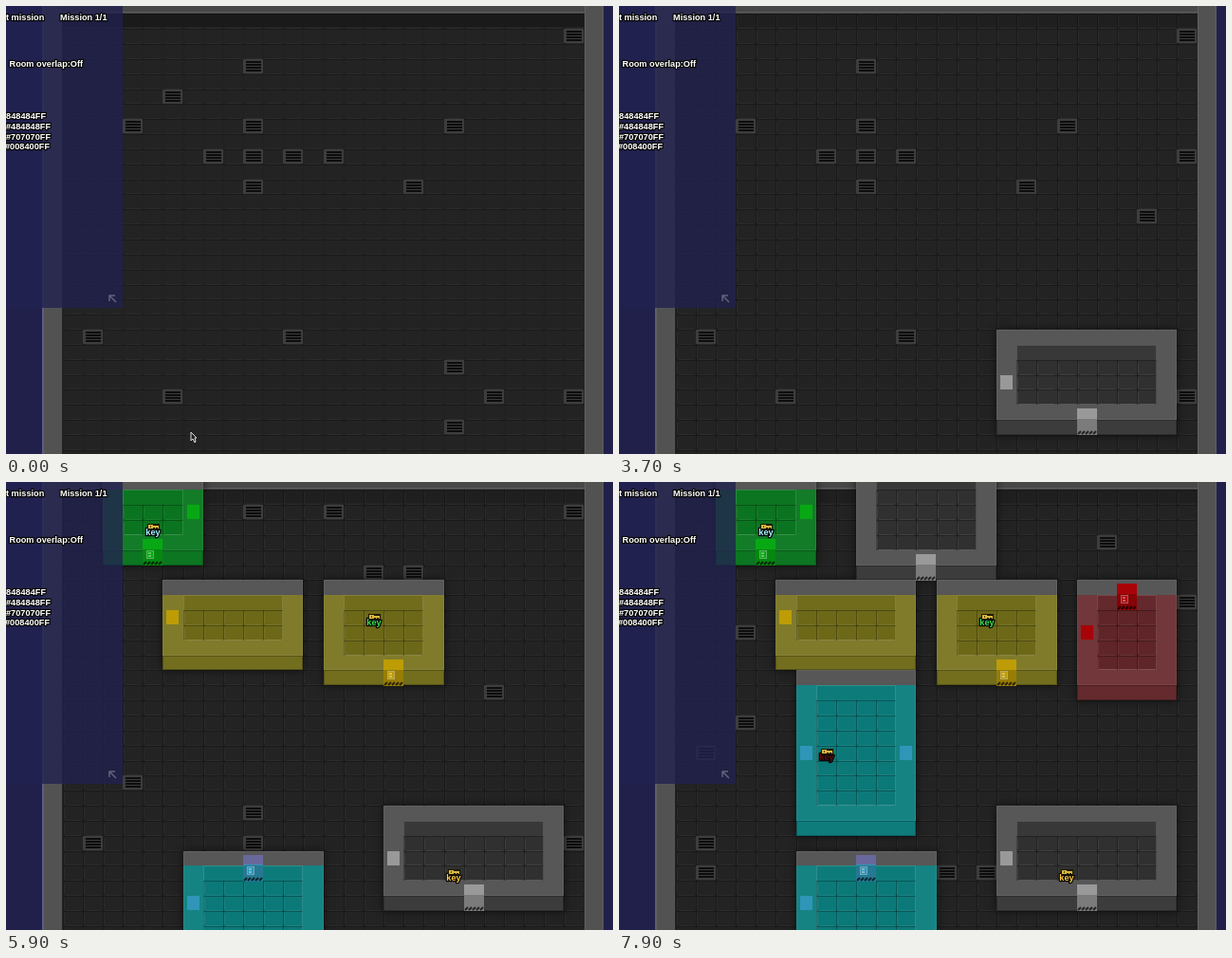
An HTML page with a canvas for the animation above (8 s loop, 640 px wide and 472 px high).

```html
<!DOCTYPE html>
<html>
<head>
<meta charset="utf-8">
<style>
html, body { margin: 0; width: 640px; height: 472px; overflow: hidden; background: #20204a; }
canvas { display: block; }
</style>
</head>
<body>
<canvas id="stage" width="640" height="472"></canvas>
<script>
const ctx = document.getElementById('stage').getContext('2d');
const LOOP = 8000;
const X = c => Math.round(38.5 + 21.15 * c);
const Y = r => Math.round(8.4 + 15.84 * r);

function rect(color, x, y, w, h) {
  ctx.fillStyle = color;
  ctx.fillRect(x, y, w, h);
}
// Rectangle in tile units, from corner (c0, r0) to (c1, r1).
function tiles(color, c0, r0, c1, r1) {
  rect(color, X(c0), Y(r0), X(c1) - X(c0), Y(r1) - Y(r0));
}
function frame(color, c0, r0, c1, r1) {
  ctx.strokeStyle = color;
  ctx.lineWidth = 1;
  ctx.strokeRect(X(c0) + .5, Y(r0) + .5, X(c1) - X(c0) - 1, Y(r1) - Y(r0) - 1);
}

// Vent layouts: [column, row] pairs on every second tile.
const shared = [[12,0],[4,1],[1,3],[4,3],[9,3],[3,4],[4,4],[5,4],[4,5],[8,5],
  [0,10],[5,10],[9,11],[2,12],[10,12],[12,12],[9,13]];
const layouts = [
  { at: 0, vents: [...shared, [2,2], [6,4]] },
  { at: 3300, vents: [...shared, [12,4], [11,6]] },
  { at: 3900, vents: [[5,0],[10,0],[11,1],[6,2],[10,3],[7,7],[0,8],[1,11],[2,13]] },
  { at: 5000, vents: [[4,0],[6,0],[12,0],[7,2],[8,2],[10,6],[1,9],[4,10],[4,11],[0,11],[12,11]] },
  { at: 6500, vents: [[12,0],[11,1],[7,2],[8,2],[9,6],[10,6],[0,11],[12,11]] },
  { at: 7400, vents: [[10,1],[12,3],[1,4],[1,7],[0,8],[0,11],[0,12],[6,12],[7,12]] }
];

const grey = { door: '#999999' };
const yellow = { tint: 'rgba(168,160,0,.5)', door: '#bd9c06' };
const green = { tint: 'rgba(0,135,28,.78)', door: '#08a814' };
const cyan = { tint: 'rgba(0,148,148,.74)', door: '#2f96b8' };
const red = { tint: 'rgba(135,28,34,.54)', door: '#a80408' };

// box: tile corners; gate: door in a horizontal wall; sides: doors in vertical walls.
const rooms = [
  { at: 3300, look: grey, box: [17,21,26,28], gate: [21,26], sides: [[17,24]] },
  { at: 3900, look: yellow, box: [6,6,13,12], sides: [[6,8]] },
  { at: 4300, look: yellow, box: [14,6,20,13], gate: [17,11], lock: true, sides: [] },
  { at: 5000, look: green, box: [3,-1,8,5], gate: [5,3], lock: true, sides: [[7,1]] },
  { at: 5600, look: cyan, box: [7,24,14,32], gate: [10,24], lock: true, lintel: '#68689c', sides: [[7,27]] },
  { at: 6500, look: cyan, box: [7,12,13,23], sides: [[7,17],[12,17]] },
  { at: 7400, look: grey, box: [10,-2,17,6], gate: [13,4], sides: [] },
  { at: 7800, look: red, box: [21,6,26,14], gate: [23,6], lock: true, sides: [[21,9]] }
];

const keys = [
  { from: 3900, to: 5000, x: 557, y: 401, color: '#ffc840' },
  { from: 5000, to: LOOP, x: 472, y: 417, color: '#ffc840' },
  { from: 5000, to: LOOP, x: 388, y: 148, color: '#38e050' },
  { from: 5600, to: LOOP, x: 155, y: 53, color: '#a4f4ff' },
  { from: 7800, to: LOOP, x: 219, y: 290, color: '#5c0c0c' }
];

function grid(c0, r0, c1, r1, dark, light, columnAlpha = 1) {
  for (let r = r0; r < r1; r++) {
    rect(dark, X(c0), Y(r), X(c1) - X(c0), 1);
    for (let c = c0; c < c1; c++) rect(light, X(c) + 3, Y(r + 1) - 1, 16, 1);
  }
  ctx.globalAlpha = columnAlpha;
  for (let c = c0; c < c1; c++) {
    rect(dark, X(c), Y(r0), 1, Y(r1) - Y(r0));
    for (let r = r0; r < r1; r++) rect(light, X(c) + 1, Y(r) + 3, 1, 11);
  }
  ctx.globalAlpha = 1;
}

function vent([i, j]) {
  const x = X(2 + 2 * i), y = Y(1 + 2 * j);
  rect('#3d3d3d', x, y, 21, 15);
  rect('#0d0d0d', x + 3, y + 2, 16, 11);
  for (let k = 0; k < 3; k++) rect('#3a3a3a', x + 3, y + 4 + 3 * k, 16, 1);
}

function gate([c, r], color, lock, lintel) {
  const x = X(c), y = Y(r) + 4;
  rect(color, x, y, 21, 28);
  if (lintel) rect(lintel, x, y, 21, 10);
  rect('rgba(0,0,0,.2)', x, y + 11, 21, 17);
  ctx.strokeStyle = 'rgba(0,0,0,.7)';
  ctx.lineWidth = 2;
  ctx.beginPath();
  for (let k = 0; k < 5; k++) {
    ctx.moveTo(x + 1 + 4 * k, y + 27);
    ctx.lineTo(x + 4 + 4 * k, y + 24);
  }
  ctx.stroke();
  if (lock) {
    const pale = 'rgba(255,255,255,.35)';
    rect(pale, x + 4, y + 12, 8, 9);
    rect(color, x + 5, y + 13, 6, 7);
    rect(pale, x + 6, y + 14, 3, 2);
    rect(pale, x + 6, y + 17, 3, 2);
  }
}

function shadow({ box }) {
  ctx.save();
  ctx.shadowColor = 'rgba(0,0,0,.6)';
  ctx.shadowBlur = 9;
  tiles('#575757', ...box);
  ctx.restore();
}

function room({ look, box: [c0, r0, c1, r1], gate: entry, lock, lintel, sides }) {
  tiles('#575757', c0, r0, c1, r1);
  tiles('#3c3c3c', c0, r1 - 1, c1, r1);
  tiles('#303030', c0 + 1, r0 + 1, c1 - 1, r1 - 2);
  tiles('#383838', c0 + 1, r0 + 1, c1 - 1, r0 + 2);
  if (look.tint) tiles(look.tint, c0, r0 + 1, c1, r1);
  grid(c0 + 1, r0 + 2, c1 - 1, r1 - 2, 'rgba(0,0,0,.28)', 'rgba(255,255,255,.07)');
  frame('rgba(255,255,255,.14)', c0 + 1, r0 + 1, c1 - 1, r1 - 2);
  frame('rgba(255,255,255,.06)', c0, r0, c1, r1 - 1);
  frame('rgba(0,0,0,.25)', c0, r1 - 1, c1, r1);
  for (const [c, r] of sides) rect(look.door, X(c) + 4, Y(r), 13, 15);
  if (entry) gate(entry, look.door, lock, lintel);
}

function label(text, x, y, color = '#fff', align = 'left') {
  ctx.font = 'bold 9.2px "Liberation Sans", Arial, sans-serif';
  ctx.textAlign = align;
  ctx.lineJoin = 'round';
  ctx.lineWidth = 2.5;
  ctx.strokeStyle = '#080808';
  ctx.strokeText(text, x, y);
  ctx.fillStyle = color;
  ctx.fillText(text, x, y);
}

function key({ x, y, color }) {
  label('key', x, y + 3, color, 'center');
  rect('#201800', x - 6, y - 9, 13, 6);
  rect('#d8b840', x - 5, y - 8, 5, 4);
  rect('#604800', x - 3, y - 7, 1, 2);
  rect('#d8b840', x, y - 7, 6, 2);
  rect('#d8b840', x + 2, y - 5, 1, 1);
  rect('#d8b840', x + 5, y - 5, 1, 1);
}

function polygon(points, fill, stroke) {
  ctx.beginPath();
  points.forEach(([x, y]) => ctx.lineTo(x, y));
  ctx.closePath();
  ctx.fillStyle = fill;
  ctx.fill();
  ctx.strokeStyle = stroke;
  ctx.lineWidth = 1;
  ctx.stroke();
}

function building(t) {
  rect('#20204a', 0, 0, 640, 472);
  rect('#232323', 59, 8, 551, 464);
  grid(1, 0, 27, 30, '#1a1a1a', '#2b2b2b', Math.min(1, .12 + t / 2200));
  rect(`rgba(0,0,0,${Math.max(.1, .25 - t / 10000)})`, 59, 8, 551, 14);
  layouts.filter(l => l.at <= t).pop().vents.forEach(vent);
  rect('#484848', 38, 0, 592, 8);
  rect('#5a5a5a', 59, 6, 551, 1);
  for (const x of [39, 610]) {
    rect('#525252', x, 0, 20, 472);
    rect('#606060', x, 0, 1, 472);
  }
  rect('#5c5c88', 38, 0, 1, 472);
  rect('#606060', 629, 0, 1, 472);
  const built = rooms.filter(r => r.at <= t);
  built.forEach(shadow);
  built.forEach(room);
  keys.filter(k => k.from <= t && t < k.to).forEach(key);
}

function panel() {
  rect('rgba(34,34,80,.79)', 0, 0, 123, 318);
  ctx.strokeStyle = '#62627a';
  ctx.lineWidth = 1.5;
  ctx.beginPath();
  ctx.moveTo(116, 312);
  ctx.lineTo(109, 305);
  ctx.moveTo(109, 311);
  ctx.lineTo(109, 305);
  ctx.lineTo(115, 305);
  ctx.stroke();
  label('t mission', 0, 15);
  label('Mission 1/1', 57, 15);
  label('Room overlap:Off', 3.5, 64);
  label('#848484FF', -5, 119);
  label('#484848FF', 0, 130);
  label('#707070FF', 0, 140.5);
  label('#008400FF', -1, 151);
}

function draw(now) {
  const t = now % LOOP;
  building(t);
  panel();
  if (t < 900) {
    polygon([[195,449],[195,458],[197,456],[199,460],[200,459],[199,455],[201,455]], '#222', '#ddd');
  }
  requestAnimationFrame(draw);
}
requestAnimationFrame(draw);
</script>
</body>
</html>
```
